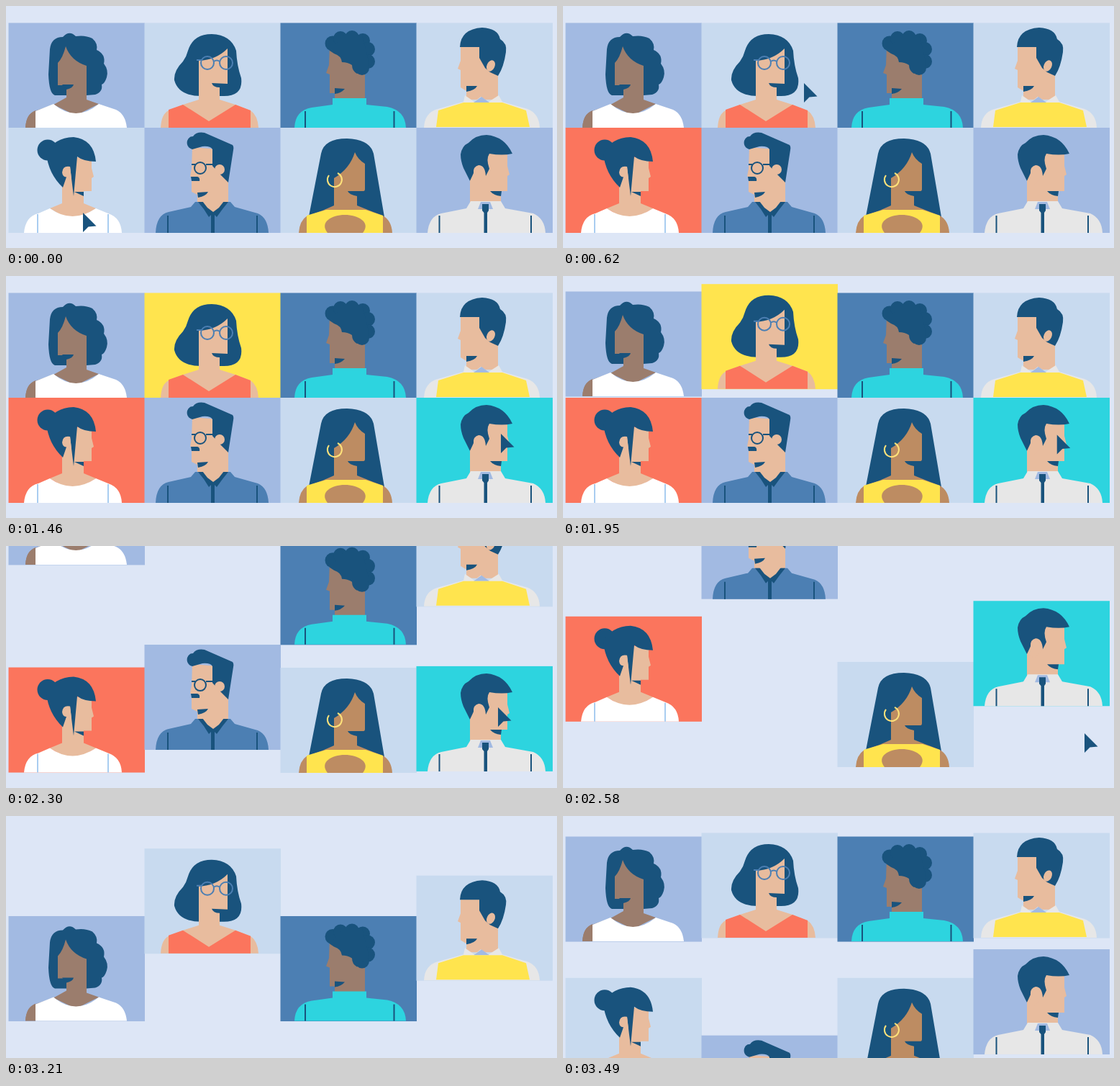
Animation of 766x336 px, one loop 3.56 s. Source, as an HTML page:

```html
<!DOCTYPE html>
<html lang="en">
<head>
<meta charset="utf-8">
<title>People grid</title>
<style>
html, body { margin: 0; width: 100%; height: 100%; overflow: hidden; background: #dde6f6; }
svg { display: block; width: 766px; height: 336px; }
.navy { fill: #19537d; }
.fair { fill: #e8bc9e; }
.dark { fill: #9b7d6d; }
.tan { fill: #bd8c62; }
.white { fill: #fff; }
.grey { fill: #e7e7e7; }
.blue { fill: #4c7fb3; }
.sky { fill: #a2bae2; }
.red { fill: #fb755d; }
.teal { fill: #2dd4df; }
.yellow { fill: #ffe44e; }
.line { fill: none; stroke: #19537d; stroke-width: 2; }
</style>
</head>
<body>
<svg viewBox="0 0 766 336">
  <g class="cell">
    <path class="navy" d="M68 124Q60 122 59 95L61 60Q63 43 79 43Q88 33 97 42Q110 40 120 45Q128 52 126 61Q139 67 136 80Q143 89 140 99Q137 108 133 109Q135 119 124 123L112 124Z"/>
    <path class="dark" d="M83 56Q79 72 72 79V110H84V127L66 137L27 169Q28 150 40 146L66 137L97 152L129 136L112 130V83Q90 76 83 56Z"/>
    <path class="dark" d="M27 169Q28 150 41 145V169Z"/>
    <path class="navy" d="M78 109H94Q93 114 84 116Z"/>
    <path class="white" d="M41 169V146L66 136Q97 162 129 136L153 144Q166 150 168 169Z"/>
  </g>
  <g class="cell">
    <path class="navy" d="M271 125Q240 125 234 103Q233 90 246 77Q251 70 253 62Q260 39 286 39Q313 40 320 62Q321 83 327 100Q330 125 303 125Z"/>
    <path class="fair" d="M268 76Q292 75 308 59V108L286 107Q288 113 297 113V130L319 137L340 145Q350 152 351 169H215Q216 150 226 145L246 137L268 130Z"/>
    <path class="red" d="M226 169V144L246 137L282 160L319 137L340 145V169Z"/>
    <g fill="none" stroke="#4c7fb3" stroke-width="2">
      <circle cx="280" cy="79" r="9"/><circle cx="306" cy="79" r="9"/>
      <path d="M265 75H272M289 77Q293 74 297 77"/>
    </g>
  </g>
  <g class="cell">
    <path class="dark" d="M450 55L449 82L445 93L450 95V121H457V135H499V60Z"/>
    <g class="navy">
      <circle cx="454" cy="52" r="10.5"/><circle cx="465" cy="45" r="10"/><circle cx="481" cy="44" r="10"/>
      <circle cx="496" cy="48" r="10"/><circle cx="503" cy="60" r="10"/><circle cx="503" cy="77" r="10"/>
      <circle cx="495" cy="86" r="10"/>
      <path d="M450 62L470 40H495L505 80L488 94Q481 90 481 82Q475 78 467 78Q466 69 456 66Z"/>
      <path d="M457 114L471 115Q466 121 457 122Z"/>
    </g>
    <path class="teal" d="M454 128H501V137L530 140Q555 145 556 169H401Q402 145 425 141L454 137Z"/>
    <path class="line" d="M416 146V169M539.5 146V169"/>
  </g>
  <g class="cell">
    <path class="fair" d="M632 55V76L628 87L632 89V113L640 118V130H684V55Z"/>
    <path class="navy" d="M631 57Q632 32 662 30Q684 31 687 46Q697 52 695 64Q692 85 684 97L673 92L666 86L658 72V57Z"/>
    <ellipse class="fair" cx="674" cy="83" rx="5.5" ry="8" transform="rotate(25 674 83)"/>
    <path class="navy" d="M640 111H655Q652 117 640 119Z"/>
    <path class="grey" d="M581 169Q582 148 600 143L636 133L638 124L651 133L660 126L671 133L685 124L690 133L725 143Q741 149 742 169Z"/>
    <path class="sky" d="M650 134L661 126L672 134Z"/>
    <path class="yellow" d="M598 168L601 145L636 134H690L723 145L728 168Z"/>
  </g>
  <g class="cell">
    <path class="fair" d="M78 210H119V225L122 237L119 239V257H108V274L125 281L93 300L61 281L78 274Z"/>
    <circle class="navy" cx="58" cy="200" r="14.5"/>
    <path class="navy" d="M56 205Q66 183 94 182Q122 185 125 216Q108 216 99 209L94 264L89 223L79 252Q59 233 56 205Z"/>
    <path class="fair" d="M89 223Q79 221 78 231Q79 239 86 237L91 240Z"/>
    <path class="navy" d="M95 258H108V264Z"/>
    <path class="white" d="M25 315Q27 292 45 288L61 281Q92 303 125 281L142 288Q160 294 161 315Z"/>
    <path class="line" style="stroke:#a9cdf0" d="M44 289V315M142 289V315"/>
  </g>
  <g class="cell">
    <path class="fair" d="M259 196L258 226L256 236L258 238V258L266 262V276H309V200Z"/>
    <path class="navy" d="M259 199Q250 196 252 187Q254 181 260 181Q265 174 276 176L315 193Q317 195 316 200L309 245L297 233L287 222V199Q284 194 273 195Z"/>
    <circle class="fair" cx="297" cy="227" r="7"/>
    <path class="navy" d="M257 237H266Q270 238 269 243H258ZM266 259L281 258Q278 264 267 266Z"/>
    <path class="line" d="M258 220H263M278 220H288"/>
    <circle class="line" cx="270" cy="225" r="8"/>
    <path class="blue" d="M208 315Q209 290 226 286L257 279L263 272H312L318 279L350 288Q364 294 365 315Z"/>
    <path class="navy" d="M267 272L275 282L282 293L285 290V315H290V290L293 293L301 282L309 272Z"/>
    <path class="fair" d="M273 271L280 280L288 286L296 280L303 271Z"/>
    <path class="line" d="M225 291V315M349 291V315"/>
  </g>
  <g class="cell">
    <path class="navy" d="M421 292L438 205Q442 184 474 184Q506 185 511 205L526 293Z"/>
    <path class="tan" d="M485 203Q478 226 456 239V277L440 284L419 291Q408 298 407 315H537Q536 298 524 291L503 283L488 277V264Q477 262 475 257H497Q499 257 499 254V219Q489 213 485 203Z"/>
    <path class="yellow" d="M418 315V291L445 283H500L524 291V315Z"/>
    <path class="tan" d="M447 315C435 300 453 290 471 290S508 300 496 315Z"/>
    <path class="line" style="stroke:#ffe27a" d="M449 235A10 10 0 1 0 461 232"/>
  </g>
  <g class="cell">
    <path class="fair" d="M645 215L672 203H697V222L700 234L697 236V257H688V277H645Z"/>
    <path class="navy" d="M645 243L636 225Q632 215 632 206Q634 194 643 190Q653 179 668 179Q693 181 704 205Q690 208 672 205Q667 212 672 226L667 236L650 234Z"/>
    <path class="fair" d="M667 236Q666 221 657 221Q649 223 650 232L645 243L655 248Z"/>
    <path class="navy" d="M673 257H689L688 264Q678 263 673 257Z"/>
    <path class="grey" d="M586 315Q588 292 605 288L640 281L646 271H688L694 281L733 288Q749 295 750 315Z"/>
    <path class="sky" d="M656 282L660 272H673L677 282Z"/>
    <path class="navy" d="M662 275H671V284L669 287V315H664.500V287L662 284Z"/>
    <path class="line" d="M602.500 291V315M730 291V315"/>
  </g>
  <path id="cursor" class="navy" d="M0 0V27L7.500 19.500L18.500 18.500Z"/>
</svg>
<script>
const LOOP = 3560, STEP = 70;
const SKY = '#a2bae2', PALE = '#c8daef';

// leave / arrive: when a tile starts to rise away and when its new copy settles
const tiles = [
  { fill: SKY, leave: 1873, arrive: 3602 },
  { fill: PALE, leave: 1790, arrive: 3411, click: 740, picked: '#ffe44e' },
  { fill: '#4c7fb3', leave: 2065, arrive: 3602 },
  { fill: PALE, leave: 1953, arrive: 3510 },
  { fill: PALE, leave: 2257, arrive: 3783, click: 190, picked: '#fb755d' },
  { fill: SKY, leave: 2075, arrive: 3908, pace: 355 },
  { fill: PALE, leave: 2432, arrive: 3783, pace: 405 },
  { fill: SKY, leave: 2221, arrive: 3668, click: 1310, picked: '#2dd4df' }
];

// time, x, y
const path = [
  [0, 107, 287], [200, 107, 287], [610, 335, 107], [770, 335, 107],
  [1250, 688, 219], [1740, 688, 219], [2300, 684, 224], [2580, 725, 260]
];
const CURSOR_END = 2800;

const cursor = document.getElementById('cursor');
document.querySelectorAll('.cell').forEach((group, i) => {
  const rect = document.createElementNS('http://www.w3.org/2000/svg', 'rect');
  const box = { x: 3.5 + 189 * (i % 4), y: i < 4 ? 23.5 : 169, width: 189.5, height: 146 };
  for (const key in box) rect.setAttribute(key, box[key]);
  group.prepend(rect);
  Object.assign(tiles[i], { group, rect });
});

const travel = (dt, pace = 370) => 100 * Math.pow(Math.max(0, dt) / pace, 2.5);

function drawTile(tile, t) {
  const rise = travel(t - tile.leave, tile.pace);
  const gone = rise > 330;
  const y = gone ? travel(tile.arrive - t) : -rise;
  const lit = !gone && t >= tile.click;
  tile.group.setAttribute('transform', `translate(0 ${y.toFixed(2)})`);
  tile.rect.setAttribute('fill', lit ? tile.picked : tile.fill);
}

function drawCursor(t) {
  const next = path.findIndex(p => p[0] > t);
  const b = path[next < 0 ? path.length - 1 : next];
  const a = next < 0 ? b : path[next - 1];
  const u = a === b ? 0 : (t - a[0]) / (b[0] - a[0]);
  const e = u * u * (3 - 2 * u);
  const [x, y] = [1, 2].map(k => a[k] + (b[k] - a[k]) * e);
  cursor.setAttribute('transform', `translate(${x} ${y})`);
  cursor.setAttribute('visibility', t < CURSOR_END ? 'visible' : 'hidden');
}

const start = performance.now();
function frame() {
  const now = (performance.now() - start) % LOOP;
  const t = Math.max(0, Math.floor((now + 10) / STEP) * STEP - 10);
  tiles.forEach(tile => drawTile(tile, t));
  drawCursor(t);
  requestAnimationFrame(frame);
}
frame();
</script>
</body>
</html>
```
